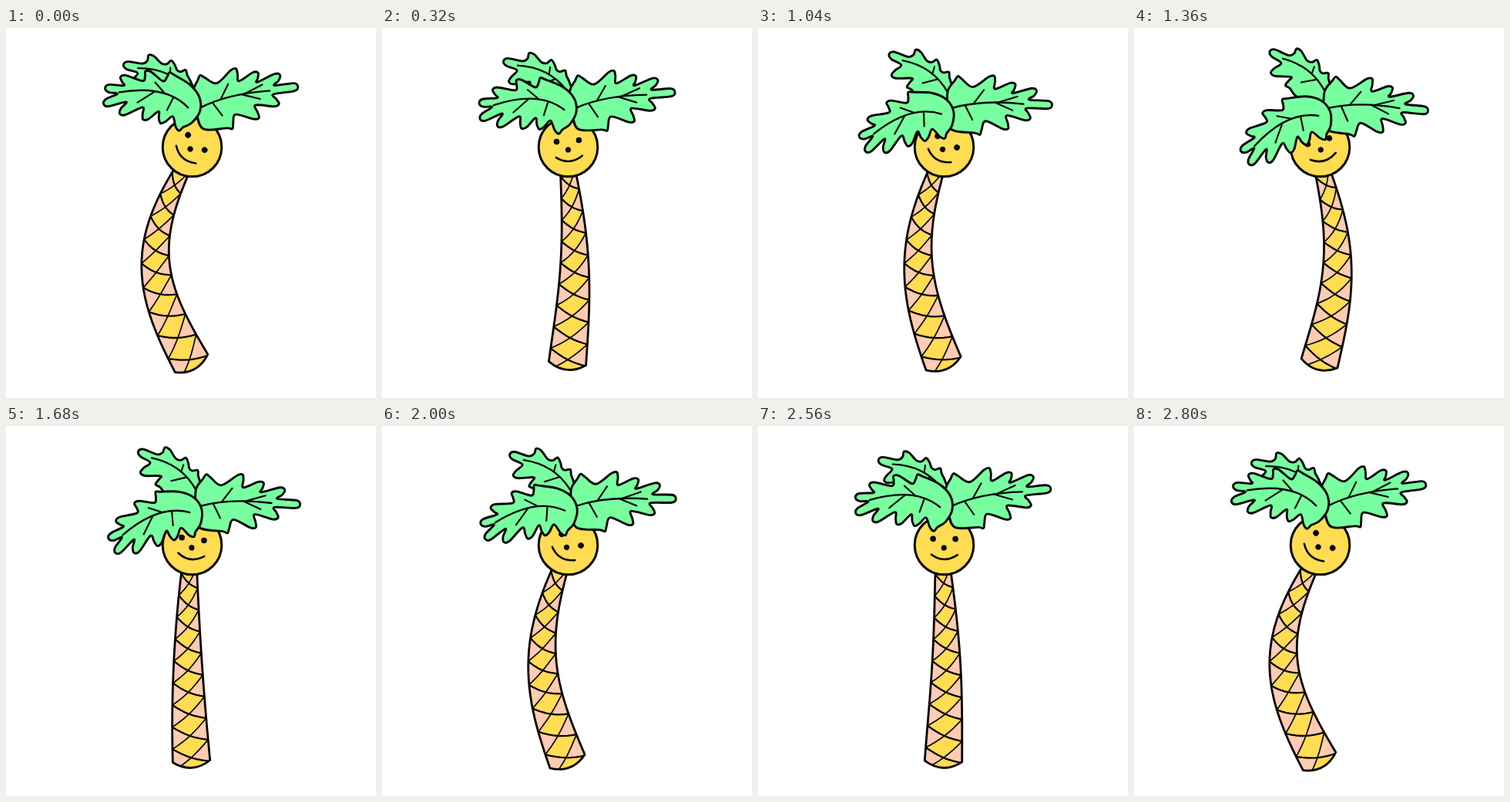
Recreate the animation shown at these times as an HTML page with a canvas. Size 480 by 480 pixels, loop 2.88 s.

```html
<!DOCTYPE html>
<html lang="en">
<head>
<meta charset="utf-8">
<title>Swaying palm</title>
<style>
  html, body { margin: 0; width: 100%; height: 100%; overflow: hidden; background: #fff; }
  canvas { display: block; width: 480px; height: 480px; }
</style>
</head>
<body>
<canvas id="stage" width="480" height="480"></canvas>
<script>
const ctx = document.getElementById('stage').getContext('2d');
const STEP = 80, STEPS = 36;
const INK = '#050505', YELLOW = '#ffdc52', PINK = '#ffcbb1', GREEN = '#78ff9f';

// Each leaf: turning point and range, smooth root edge, rib curve,
// and lobe ends running from the root round the tip and back.
const backLeaf = {
  pivot: [228, 126], turn: 16, tip: 3,
  root: [[210, 93], [250, 95], [248, 74]],
  rib: [[243, 82], [222, 50], [182, 45]],
  lobes: [[243, 56], [226, 41], [198, 30], [164, 38], [169, 65], [190, 79]]
};
const rightLeaf = {
  pivot: [250, 103], turn: 14.2, tip: 4,
  root: [[252, 131], [246, 104], [245, 82]],
  rib: [[251, 104], [290, 90], [344, 93]],
  lobes: [[257, 62], [304, 59], [332, 68], [360, 75], [381, 92], [354, 111], [326, 126], [290, 136]]
};
const frontLeaf = {
  pivot: [253, 104], turn: -39, tip: 3,
  root: [[248, 126], [253, 108], [246, 91], [229, 80]],
  rib: [[237, 109], [200, 90], [146, 120]],
  lobes: [[199, 74], [169, 83], [141, 101], [127, 121], [132, 141], [156, 146], [187, 143],
    [210, 140], [236, 141]]
};

const lerp = (a, b, t) => [a[0] + (b[0] - a[0]) * t, a[1] + (b[1] - a[1]) * t];
const range = (count, fn) => Array.from({ length: count + 1 }, (_, i) => fn(i / count));

// Smooth closed curve through points.
function blob(pts) {
  const n = pts.length, at = i => pts[(i + n) % n];
  ctx.beginPath();
  ctx.moveTo(...pts[0]);
  for (let i = 0; i < n; i++) {
    const [a, b, c, d] = [at(i - 1), at(i), at(i + 1), at(i + 2)];
    ctx.bezierCurveTo(b[0] + (c[0] - a[0]) / 6, b[1] + (c[1] - a[1]) / 6,
      c[0] - (d[0] - b[0]) / 6, c[1] - (d[1] - b[1]) / 6, c[0], c[1]);
  }
  ctx.closePath();
}

function polyline(pts) {
  ctx.beginPath();
  pts.forEach(p => ctx.lineTo(...p));
}

function arch(a, b, c) {
  ctx.beginPath();
  ctx.moveTo(...a);
  ctx.quadraticCurveTo(...b, ...c);
}

function dot(x, y, r) {
  ctx.beginPath();
  ctx.arc(x, y, r, 0, 2 * Math.PI);
}

function fill(color) { ctx.fillStyle = color; ctx.fill(); }
function stroke(width) { ctx.lineWidth = width; ctx.stroke(); }

function turned([x, y], deg, draw) {
  ctx.save();
  ctx.translate(x, y);
  ctx.rotate(deg * Math.PI / 180);
  ctx.translate(-x, -y);
  draw();
  ctx.restore();
}

// Three points that round off a lobe, across its own direction.
function lobeCap(end, foot, prev, next, r = 5) {
  const dx = end[0] - foot[0], dy = end[1] - foot[1], len = Math.hypot(dx, dy);
  const u = dx / len * r, v = dy / len * r;
  const s = Math.sign((next[1] - prev[1]) * u - (next[0] - prev[0]) * v);
  const [x, y] = [end[0] - u, end[1] - v];
  return [[x + s * v, y - s * u], end, [x - s * v, y + s * u]];
}

function drawLeaf({ pivot, turn, tip, root, rib, lobes }, lift) {
  const n = lobes.length;
  const along = t => lerp(lerp(rib[0], rib[1], t), lerp(rib[1], rib[2], t), t);
  const reach = i => 0.85 * (i <= tip ? (i + 1) / (tip + 1) : (n - i) / (n - tip));
  const edge = [...root];
  lobes.forEach((end, i) => {
    const prev = lobes[i - 1] || root[root.length - 1], next = lobes[i + 1] || root[0];
    edge.push(...lobeCap(end, along(reach(i)), prev, next));
    if (i < n - 1) {
      edge.push(lerp(lerp(end, next, 0.5), along((reach(i) + reach(i + 1)) / 2), 0.38));
    }
  });
  turned(pivot, turn * (lift - 0.5), () => {
    blob(edge);
    fill(GREEN);
    stroke(2.9);
    arch(...rib);
    stroke(2.3);
    lobes.forEach((end, i) => {
      if (i % 2 === 0 || i === tip) return;
      const foot = along(reach(i));
      polyline([foot, lerp(foot, end, 0.5)]);
      stroke(2.1);
    });
  });
}

function drawTrunk(bend) {
  const TOP = 165, BASE = 435, WAVE = Math.PI / (BASE - TOP);
  // side: -1 left edge, 1 right edge
  const point = (y, side) => {
    const a = (y - TOP) * WAVE;
    const x = 235.8 + 0.00021 * (y - 285) ** 2 + 42 * bend * Math.sin(a);
    const slope = 0.00042 * (y - 285) + 42 * bend * WAVE * Math.cos(a);
    const u = (y - 192) / 245;
    const w = side * (10.3 + 19.5 * u - 5.5 * u * u) / Math.hypot(1, slope);
    return [x + w, y - w * slope];
  };
  const level = j => 418 + 28.3 * j;
  const sag = f => 0.11 * Math.sin(Math.PI * f);
  const fall = (k, f) => point(level(k + 0.65 * f + sag(f)), 2 * f - 1);
  const rise = (k, f) => point(level(k + 1 - 1.35 * f + sag(f)), 2 * f - 1);
  const part = (line, k, from, to) => range(8, s => line(k, from + (to - from) * s));

  const left = range(30, s => point(TOP + (BASE - TOP) * s, -1));
  const right = range(30, s => point(BASE - (BASE - TOP) * s, 1));
  const [lx, ly] = left[30], [rx, ry] = right[0];
  const cap = [(lx + rx) / 2 - (ry - ly) * 0.35, (ly + ry) / 2 + (rx - lx) * 0.35];
  const outline = () => {
    polyline(left);
    ctx.quadraticCurveTo(...cap, rx, ry);
    right.forEach(p => ctx.lineTo(...p));
  };

  ctx.save();
  outline();
  fill(PINK);
  ctx.clip();
  for (let k = -10; k <= 1; k++) {
    polyline([
      ...part(fall, k, 0.5, 1), ...part(rise, k + 1, 1, 0.5),
      ...part(fall, k + 1, 0.5, 0), ...part(rise, k, 0, 0.5)
    ]);
    fill(YELLOW);
  }
  for (let k = -10; k <= 1; k++) {
    polyline(part(fall, k, 0, 1));
    stroke(2.3);
    polyline(part(rise, k, 0, 1));
    stroke(1.7);
  }
  ctx.restore();
  outline();
  stroke(2.8);
}

function drawHead(deg) {
  const center = [241.5, 154.5];
  dot(...center, 38.3);
  fill(YELLOW);
  stroke(3);
  turned(center, deg, () => {
    for (const x of [227, 256]) { dot(x, 146.5, 3.8); fill(INK); }
    dot(241.3, 158, 3.6);
    fill(INK);
    arch([225, 167], [241.5, 179], [259, 167]);
    stroke(2.6);
  });
}

// Trunk and face: left to right and back every 12 steps, the last pass a little faster.
function swing(n) {
  const s = n <= 30 ? n : 30 + (n - 30) * 1.2;
  return 1 - Math.abs(s % 12 - 6) / 3;
}

function draw(n) {
  const bend = swing(n);
  const lift = 1 - Math.abs(n - 17.5) / 17.5;
  ctx.fillStyle = '#fff';
  ctx.fillRect(0, 0, 480, 480);
  ctx.strokeStyle = INK;
  ctx.lineCap = ctx.lineJoin = 'round';
  drawTrunk(bend);
  drawHead(7.5 - 34.5 * bend);
  for (const leaf of [backLeaf, rightLeaf, frontLeaf]) drawLeaf(leaf, lift);
}

const start = performance.now();
function tick() {
  draw(Math.floor((performance.now() - start) / STEP) % STEPS);
  requestAnimationFrame(tick);
}
tick();
</script>
</body>
</html>
```
